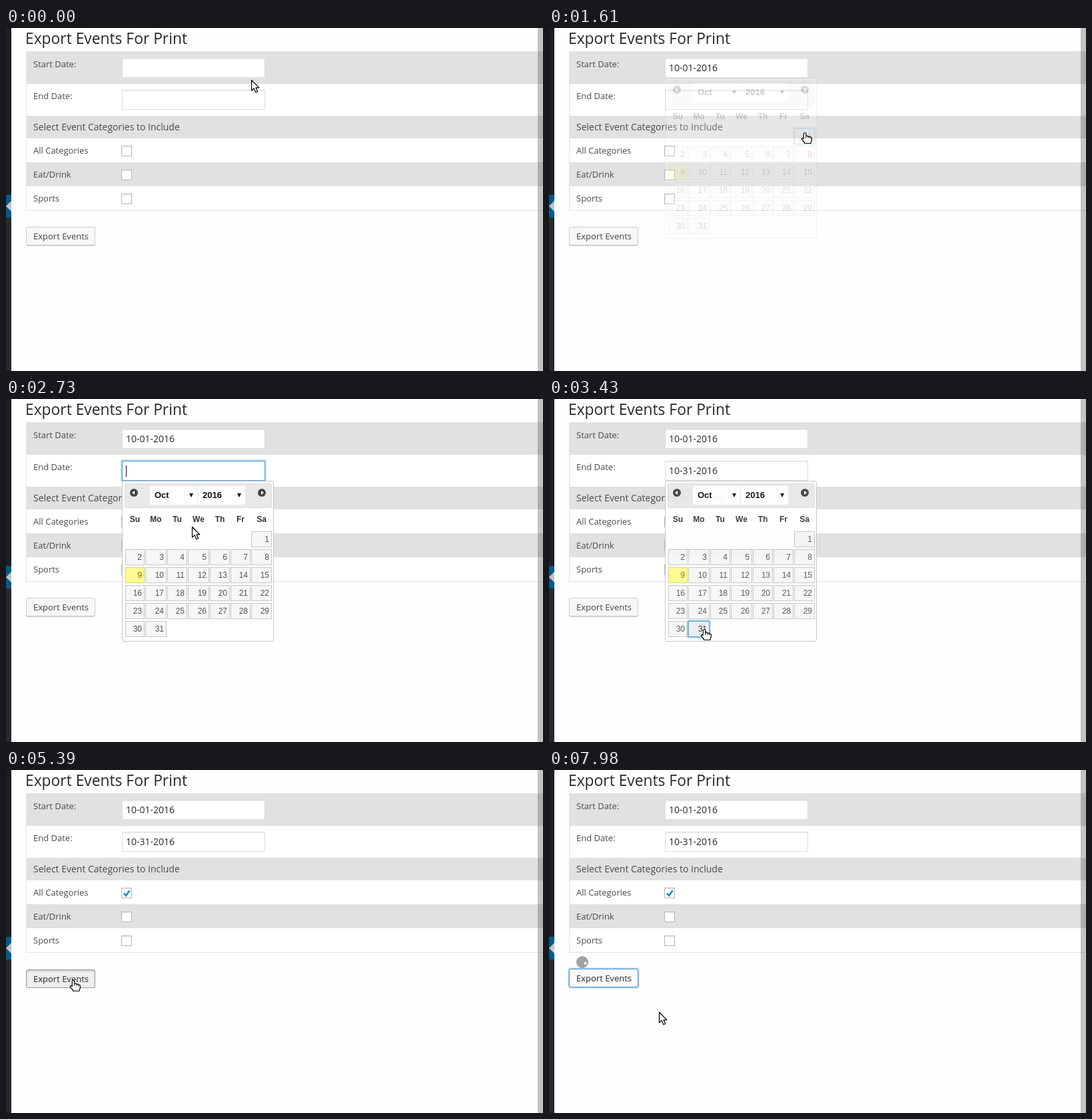
An HTML page for the animation above (8 s loop, 806 px wide and 516 px high).

```html
<!DOCTYPE html>
<html lang="en">
<head>
<meta charset="utf-8">
<title>Export Events For Print</title>
<style>
html, body { margin: 0; width: 100%; height: 100%; overflow: hidden; }
#stage { position: relative; width: 806px; height: 516px; overflow: hidden; background: #fefefe;
  font: 13px/20px "Open Sans", "Noto Sans", sans-serif; color: #4a4a4a; }
#stage * { position: absolute; box-sizing: border-box; white-space: nowrap; }
h1 { margin: 0; left: 29px; top: 1px; font-size: 22.8px; line-height: 30px; font-weight: 400; color: #23282d; }

.menu { left: 0; top: 0; width: 8px; height: 516px;
  background: linear-gradient(#1b1f23 251px, #005b8a 251px 285px, #262a2e 285px); }
.notch { left: 0; top: 260px; border: solid transparent; border-width: 8px 8px 8px 0; border-right-color: #c2c4c6; }
.shade { left: 798px; top: 0; width: 8px; height: 516px; background: rgba(0, 0, 0, .23); }

.table { left: 30px; top: 35px; width: 790px; height: 240px; border: 1px solid #e1e1e1; background: #fff; }
.row { left: 31px; width: 775px; background: #e1e1e1; }
.label { left: 41px; }
.big { font-size: 14px; }

.field { left: 174px; width: 215px; height: 30px; border: 1px solid #ddd; background: #fff;
  box-shadow: inset 0 1px 2px rgba(0, 0, 0, .07); }
.field span { left: 5px; top: 4px; font-size: 14px; color: #23282d; }
.field i { left: 5px; top: 6px; width: 1px; height: 17px; background: #111; }
.box { left: 173px; width: 16px; height: 16px; border: 1px solid #b4b9be; background: #fff;
  box-shadow: inset 0 1px 2px rgba(0, 0, 0, .1); }
.box svg { left: -1px; top: -1px; overflow: visible; }

.button { left: 30px; top: 299px; width: 104px; height: 28px; border: 1px solid #ccc; border-radius: 3px;
  background: #f7f7f7; box-shadow: 0 1px 0 #ccc; color: #444; }
.button span { left: 10px; top: 3px; }
.button.hover { background: #fafafa; border-color: #999; color: #23282d; }
.field.focus, .box.focus, .button.focus { border-color: #5b9dd9; box-shadow: 0 0 2px 1px rgba(30, 140, 190, .6); }
.button.focus { background: #fafafa; color: #23282d; }
.button.active { top: 300px; background: #eee; border-color: #999; color: #23282d;
  box-shadow: inset 0 2px 5px -3px rgba(0, 0, 0, .5); }

.spinner { left: 41px; top: 280px; width: 18px; height: 18px; border-radius: 50%; background: #a2a2a2; }
.spinner i { left: 7px; top: 7px; width: 4px; height: 4px; border-radius: 50%; background: #fff; }

.calendar { left: 174px; width: 228px; height: 242px; border: 1px solid #c5c5c5; border-radius: 3px; background: #fff;
  font: 12px/22px "Liberation Sans", Arial, sans-serif; color: #555; }
.head { left: 3px; top: 3px; width: 221px; height: 37px; border: 1px solid #ddd; border-radius: 3px; background: #e9e9e9; }
.pick { top: 7px; width: 71px; height: 28px; background: #fff; color: #111; font-size: 13px; font-weight: 700; line-height: 28px; }
.pick span { left: 7px; }
.pick i { left: 59px; top: 11px; border: solid transparent; border-width: 6px 3px 0; border-top-color: #111; }
.turn { top: 11px; width: 12px; height: 12px; border-radius: 50%; background: #444; }
.turn i { left: 3px; top: 3px; border: solid transparent; border-width: 3px 4px 3px 0; border-right-color: #fff; }
.next { transform: scaleX(-1); }
.calendar b { top: 46px; width: 30px; text-align: center; color: #333; }
.day { height: 24px; padding-right: 3px; border: 1px solid #c5c5c5; background: #f6f6f6; text-align: right; }
.today { background: #fffa90; border-color: #dad55e; color: #777620; }
.day.hover { background: #ededed; color: #2b2b2b; }
.day.focus { border-color: #5b9dd9; box-shadow: 0 0 2px 1px rgba(30, 140, 190, .7); }

#cursor { left: 0; top: 0; overflow: visible; }
#cursor g { fill: #fff; stroke: #000; stroke-width: 1.2; stroke-linejoin: round; }
</style>
</head>
<body>
<div id="stage">
  <div class="menu"></div><div class="notch"></div>
  <h1>Export Events For Print</h1>
  <div class="table"></div>
  <div class="row" style="top:36px;height:48px"></div>
  <div class="row" style="top:132px;height:34px"></div>
  <div class="row" style="top:202px;height:36px"></div>
  <span class="label" style="top:44px">Start Date:</span>
  <span class="label" style="top:92px">End Date:</span>
  <span class="label big" style="top:139px">Select Event Categories to Include</span>
  <span class="label" style="top:174px">All Categories</span>
  <span class="label" style="top:210px">Eat/Drink</span>
  <span class="label" style="top:246px">Sports</span>
  <div class="field" style="top:45px"><span>10-01-2016</span><i></i></div>
  <div class="field" style="top:93px"><span>10-31-2016</span><i></i></div>
  <div class="box" id="all" style="top:177px">
    <svg width="16" height="16"><path d="M4 8.2 7 12 12.6 4.2" fill="none" stroke="#1e8cbe" stroke-width="2.6"/></svg>
  </div>
  <div class="box" style="top:213px"></div>
  <div class="box" style="top:249px"></div>
  <div class="spinner"><i></i></div>
  <div class="button"><span>Export Events</span></div>
  <div class="shade"></div>
  <svg id="cursor" width="1" height="1">
    <g id="arrow"><path d="M.5 .5V16.2L4.2 12.8 6.8 19 9.6 17.8 7 11.8H11.8Z"/></g>
    <g id="hand">
      <path d="M-1.7 9.5V2Q-1.7.5 0 .5T1.7 2V5.8Q4 4.8 5 6.4 7.2 5.6 8 7.2 10.4 6.8 10.4 9V12L9 15V16.5H-.6V15L-4.4 10.8Q-5 8.8-3.4 8.6Z"/>
      <path d="M1.7 6V9M5 6.6V9M8 7.4V9.4" stroke-width=".8"/>
    </g>
    <g id="beam">
      <path d="M-3-7H-1L0-6 1-7H3M-3 7H-1L0 6 1 7H3M0-6V6" fill="none" stroke="#fff" stroke-width="4"/>
      <path d="M-3-7H-1L0-6 1-7H3M-3 7H-1L0 6 1 7H3M0-6V6" fill="none" stroke-width="1.8"/>
    </g>
  </svg>
</div>
<script>
const LOOP = 8000, TICK = 70;
const $ = (sel, root = document) => root.querySelector(sel);
const stage = $('#stage'), cursor = $('#cursor'), button = $('.button'), allBox = $('#all');

// Left edge and width of each weekday column
const COLUMNS = [[4, 29], [34, 32], [67, 30], [98, 32], [131, 30], [162, 30], [193, 31]];
const NAMES = ['Su', 'Mo', 'Tu', 'We', 'Th', 'Fr', 'Sa'];

function makeCalendar(top) {
  const el = document.createElement('div');
  el.className = 'calendar';
  el.style.top = top + 'px';
  let html = `<div class="head"></div>
    <div class="turn" style="left:11px"><i></i></div><div class="turn next" style="left:203px"><i></i></div>
    <div class="pick" style="left:41px"><span>Oct</span><i></i></div>
    <div class="pick" style="left:113px"><span>2016</span><i></i></div>`;
  NAMES.forEach((name, i) => {
    const [x, w] = COLUMNS[i];
    html += `<b style="left:${x + w / 2 - 15}px">${name}</b>`;
  });
  for (let day = 1; day <= 31; day++) {
    const slot = day + 5, [x, w] = COLUMNS[slot % 7], y = 75 + 27 * Math.floor(slot / 7);
    html += `<div class="day${day === 9 ? ' today' : ''}" data-day="${day}"
      style="left:${x}px;top:${y}px;width:${w}px">${day}</div>`;
  }
  el.innerHTML = html;
  stage.insertBefore(el, $('.shade'));
  return el;
}

const fields = document.querySelectorAll('.field');
const pickers = [
  { top: 75, day: 1, focus: 490, open: 450, press: 1400, pick: 1470 },
  { top: 123, day: 31, focus: 2380, open: 2310, press: 3290, pick: 3400 }
].map((p, i) => {
  const el = makeCalendar(p.top);
  return { ...p, el, field: fields[i], cell: $(`[data-day="${p.day}"]`, el) };
});

// Pointer stops: time, x, y
const PATH = [
  [0, 368, 78], [350, 371, 60], [560, 371, 60], [1190, 384, 157], [1650, 384, 157],
  [2170, 303, 111], [2450, 303, 111], [3150, 233, 346], [3500, 233, 346], [4060, 178, 193],
  [4200, 178, 181], [4480, 178, 181], [5180, 101, 316], [5560, 101, 316], [6300, 165, 362],
  [6440, 165, 364], [LOOP, 165, 364]
];

const swing = k => .5 - Math.cos(Math.PI * Math.min(1, Math.max(0, k))) / 2;
const within = (v, a, b) => v >= a && v < b;
const show = (el, on) => { el.style.visibility = on ? 'visible' : 'hidden'; };
const mark = (el, name, on) => el.classList.toggle(name, on);

function pointerAt(t) {
  const i = PATH.findIndex(p => p[0] > t);
  const [t0, x0, y0] = PATH[i - 1], [t1, x1, y1] = PATH[i];
  const k = swing((t - t0) / (t1 - t0));
  return [x0 + (x1 - x0) * k, y0 + (y1 - y0) * k];
}

function pointerKind(x, y, onButton) {
  if (onButton) return 'hand';
  for (const p of pickers) {
    const dy = y - p.top;
    if (p.alpha > 0 && within(x, 174, 402) && within(dy, 0, 242))
      return dy > 103 || (dy > 76 && x > 368) ? 'hand' : 'arrow';
  }
  const onField = within(x, 174, 389) && (within(y, 45, 75) || within(y, 93, 123));
  return onField ? 'beam' : 'arrow';
}

function draw(t) {
  const [x, y] = pointerAt(t);
  for (const p of pickers) {
    p.alpha = swing((t - p.open) / 200) - swing((t - p.pick) / 200);
    p.el.style.opacity = p.alpha;
    show(p.el, p.alpha > 0);
    mark(p.field, 'focus', within(t, p.focus, p.press));
    show($('span', p.field), t >= p.pick);
    show($('i', p.field), within(t, p.focus, p.focus + 600));
    const dy = y - p.top;
    mark(p.cell, 'hover', p.day === 1 ? x > 368 && within(dy, 76, 101) : within(x, 209, 241) && dy > 210);
    mark(p.cell, 'focus', t >= p.press);
  }

  mark(allBox, 'focus', within(t, 4410, 5390));
  show($('svg', allBox), t >= 4480);

  const onButton = within(x, 30, 134) && within(y, 299, 328);
  mark(button, 'hover', onButton);
  mark(button, 'active', within(t, 5390, 5530));
  mark(button, 'focus', t >= 5530);

  show($('.spinner'), t >= 5530);
  const turn = .38 + 2 * Math.PI * (t - 7980) / 1000;
  $('.spinner i').style.transform = `translate(${5 * Math.cos(turn)}px, ${5 * Math.sin(turn)}px)`;

  const kind = pointerKind(x, y, onButton);
  for (const shape of cursor.children) show(shape, shape.id === kind);
  cursor.style.transform = `translate(${Math.round(x)}px, ${Math.round(y)}px)`;
}

const start = performance.now();
function frame() {
  const t = (performance.now() - start) % LOOP;
  draw(Math.floor(t / TICK) * TICK);
  requestAnimationFrame(frame);
}
frame();
</script>
</body>
</html>
```
